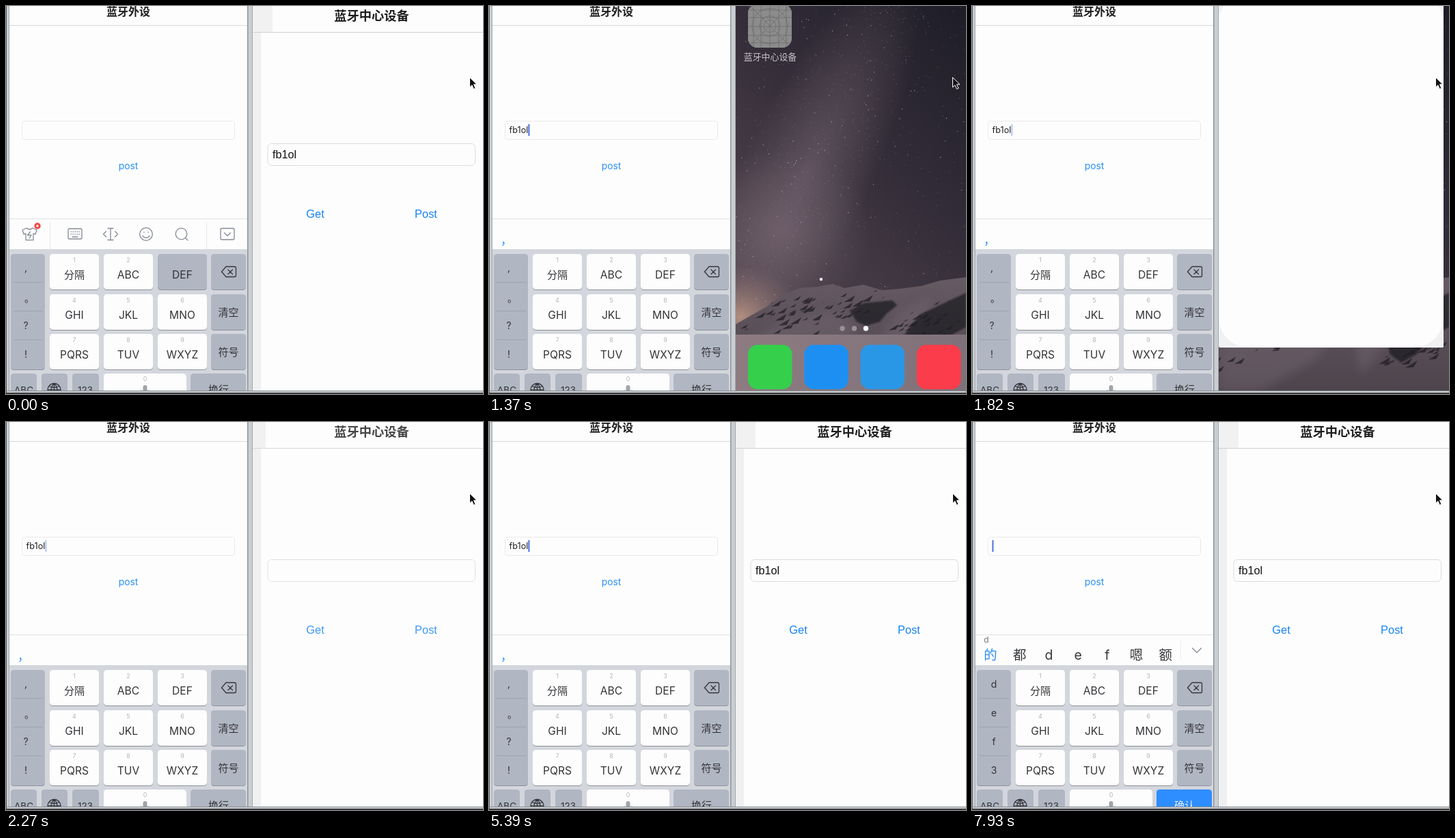
Write an HTML page that moves like this. It is 698 px wide and 568 px high and loops after 8000 ms.

```html
<!DOCTYPE html>
<html lang="zh">
<head>
<meta charset="utf-8">
<title>蓝牙外设</title>
<style>
html, body { margin: 0; width: 100%; height: 100%; overflow: hidden; background: #c9ced2; }
svg { display: block; width: 698px; height: 568px; }
text { font-family: Inter, "Noto Sans CJK SC", "Noto Sans CJK", sans-serif; }
.hv { font-family: "Liberation Sans", "Noto Sans CJK SC", sans-serif; }
.ic { fill: none; stroke: #858a96; stroke-width: 1.3; stroke-linecap: round; stroke-linejoin: round; }
</style>
</head>
<body>
<svg id="stage" viewBox="0 0 698 568" xmlns="http://www.w3.org/2000/svg"></svg>
<script>
const LOOP = 8000, BLUE = '#2b8ff5', KEY = '#b0b6c2', WHITE = '#fdfdfd', INK = '#333437';

const rect = (x, y, w, h, fill, more = '') =>
  `<rect x="${x}" y="${y}" width="${w}" height="${h}" fill="${fill}" ${more}/>`;
const text = (x, y, s, size, fill = INK, more = 'text-anchor="middle"') =>
  `<text x="${x}" y="${y}" font-size="${size}" fill="${fill}" ${more}>${s}</text>`;
const path = (d, more = 'class="ic"') => `<path d="${d}" ${more}/>`;
const group = (id, body, more = '') => `<g id="${id}" ${more}>${body}</g>`;
const key = (x, y, w, h, fill, id = '') =>
  rect(x, y + 1, w, h, '#8d9199', 'rx="4.5"') + rect(x, y, w, h, fill, `rx="4.5" ${id && `id="${id}"`}`);

// small seeded generator for the night sky and the snow
function random(seed) {
  return () => (seed = (seed * 16807) % 2147483647) / 2147483647;
}

function letterKeys() {
  const labels = ['分隔', 'ABC', 'DEF', 'GHI', 'JKL', 'MNO', 'PQRS', 'TUV', 'WXYZ'];
  return labels.map((s, i) => {
    const x = 64 + (i % 3) * 79, y = [363, 422, 480][Math.floor(i / 3)];
    return key(x, y, 72, 52, WHITE, 'k' + s) + text(x + 36, y + 12, i + 1, 9, '#b4b6ba') +
      text(x + 36, y + 36, s, i ? 15.6 : 15);
  }).join('');
}

function sideColumn() {
  const lines = [404, 446, 488].map(y => rect(11, y, 43, 1, '#9da3af')).join('');
  const marks = text(29, 388, ',', 14) + text(34, 433, '。', 14) + text(29, 473, '?', 14) + text(29, 515, '!', 14);
  const letters = ['d', 'e', 'f', '3'].map((s, i) => text(32, 389 + 42 * i, s, 14)).join('');
  return key(7, 363, 50, 169, KEY) + lines + group('marks', marks) + group('letters', letters);
}

function keyboard() {
  const dark = 'class="ic" style="stroke:#34363b"';
  const backspace = path('M322 381.5h12.5q2 0 2 2v11q0 2 -2 2h-12.5l-6.5-7.5zM325 386l6.5 6.5M331.5 386l-6.5 6.5', dark);
  const globe = path('M61 562a9.5 9.5 0 1 0 19 0a9.5 9.5 0 1 0 -19 0h19M70.5 552.5v19M70.5 552.5q-9 9.5 0 19M70.5 552.5q9 9.5 0 19M63 556.5q7.5 4 15 0', dark);
  return rect(5, 356, 348, 208, '#d3d6dc') + sideColumn() + letterKeys() +
    key(300, 363, 51, 52, KEY, 'erase') + backspace +
    key(300, 422, 51, 52, KEY) + text(325.5, 454, '清空', 15) +
    key(300, 480, 51, 52, KEY) + text(325.5, 512, '符号', 15) +
    key(7, 538, 38, 52, KEY) + text(26, 567, 'ABC', 13.5) +
    key(52, 538, 38, 52, KEY) + globe +
    key(97, 538, 39, 52, KEY) + text(116, 567, '123', 13.5) +
    key(143, 538, 121, 52, WHITE) + text(203.5, 549, '0', 9, '#b4b6ba') +
    rect(200.5, 555, 6, 14, '#a2a4a8', 'rx="3"') + path('M198 561v3q0 5 5.5 5t5.5-5v-3', 'fill="none" stroke="#b8babd"') +
    key(270, 538, 81, 52, KEY, 'enter') + text(311, 567, '换行', 15, INK, 'id="enterText" text-anchor="middle"');
}

function toolbar() {
  const dots = [0, 1, 2, 3, 4].map(i => `M${95 + i * 3} 330.5h.4M${95 + i * 3} 334h.4`).join('');
  return path('M30 325l-6 3 2 6 3-.8v9.5h11v-9.5l3 .8 2-6-6-3q-4.5 4-9 0zM35.5 330.5l-4 5h5.5l-3 4.5') +
    `<circle cx="46" cy="322" r="3.2" fill="#fff" stroke="#f04848" stroke-width="3"/>` +
    rect(64, 317, 1, 39, '#e6e7e9') + rect(293, 317, 1, 39, '#e6e7e9') +
    path('M93 326h16q2 0 2 2v11q0 2 -2 2h-16q-2 0 -2-2v-11q0-2 2-2zM97 338h8' + dots) +
    path('M149 325.5h8M153 325.5v17M149 342.5h8M146.5 330l-4 4 4 4M159.5 330l4 4-4 4') +
    `<circle class="ic" cx="205" cy="334" r="9.3"/>` +
    path('M200 336.5q5 6 10 0M202 331v.5M208 331v.5') +
    `<circle class="ic" cx="256.5" cy="333.5" r="8.3"/>` + path('M262.5 339.5l3.5 3.5') +
    path('M316 325.5h16q2 0 2 2v12.5q0 2 -2 2h-16q-2 0 -2-2v-12.5q0-2 2-2zM319.5 332l4.5 4.5 4.5-4.5');
}

function candidates() {
  const words = ['的', '都', 'd', 'e', 'f', '嗯', '额'];
  return text(21, 323, 'd', 12, '#777') +
    words.map((s, i) => text(27 + i * 42.7, 348, s, 19.5, i ? '#35373b' : BLUE)).join('') +
    rect(305, 320, 1, 28, '#eceded') + path('M322.5 331l6.5 6.5 6.5-6.5');
}

function leftPhone() {
  return rect(5, 0, 349, 564, WHITE) + rect(5, 28, 349, 1, '#d9d9dc') +
    text(179, 14, '蓝牙外设', 16, '#1d1d1f', 'text-anchor="middle" font-weight="700"') +
    rect(23.5, 168.5, 311, 27, 'none', 'rx="4" stroke="#e9e9e9" id="field"') +
    text(29.5, 186.3, '', 12.7, '#222', 'id="typed"') +
    rect(30, 173, 2, 17, '#4a6fe0', 'id="caret"') +
    text(179, 238.5, 'post', 13.8, BLUE) +
    rect(5, 311, 349, 1, '#dfe0e2') +
    group('tools', toolbar()) + group('words', candidates()) +
    group('comma', text(17, 349, '，', 17, BLUE, '')) + keyboard();
}

function sky() {
  const next = random(77);
  let faint = '', bright = '';
  for (let i = 0; i < 700; i++) {
    const y = next() * 440, band = 585 - y * .45;
    const x = i % 3 ? band + (next() + next() - 1) * 130 : 361 + next() * 337;
    const dot = `M${x.toFixed(1)} ${y.toFixed(1)}h.01`;
    if (i % 7) faint += dot; else bright += dot;
  }
  const stars = 'fill="none" stroke-linecap="round" ';
  return rect(361, 0, 337, 564, 'url(#night)') +
    `<ellipse cx="465" cy="245" rx="95" ry="330" transform="rotate(25 465 245)" fill="url(#haze)"/>` +
    `<ellipse cx="430" cy="330" rx="130" ry="120" fill="url(#haze)"/>` +
    `<ellipse cx="368" cy="455" rx="90" ry="75" fill="url(#dusk)"/>` +
    path(faint, stars + 'stroke="#a095a4" stroke-width="1" opacity=".6"') +
    path(bright, stars + 'stroke="#d8d0dc" stroke-width="1.3" opacity=".7"') +
    `<circle cx="486" cy="400" r="2.3" fill="#e9e6f2"/>`;
}

// dark rock streaks running down the slope
function rocks(seed, count, x, y, w, h) {
  const next = random(seed);
  let d = '';
  for (let i = 0; i < count; i++) {
    const u = next(), v = next(), run = 4 + next() * 14;
    d += `M${(x + u * w).toFixed(1)} ${(y + v * h - u * h * .35).toFixed(1)}l${(-run).toFixed(1)} ${(run * .6).toFixed(1)}l${(run * .7).toFixed(1)} -1z`;
  }
  return path(d, 'fill="#211d25" opacity=".75"');
}

function mountains() {
  const ridge = 'M361 466L385 452 405 441 433 421 455 413 480 411 503 407 520 413 548 408 575 416 600 414 632 410 660 402 698 397V564H361z';
  return path(ridge, 'fill="url(#snow)"') +
    `<g clip-path="url(#ridge)">` +
    path('M361 500L430 462 500 446 540 470 500 520 420 564H361zM560 500L600 448 650 424 640 450 600 500 570 540z', 'fill="#7d6f79" opacity=".35" filter="url(#blur)"') +
    path('M528 446L548 435 590 431 597 438 582 450 572 462 552 468 538 462zM606 484L630 452 698 420V470L672 484 650 510 628 522 612 510z', 'fill="#1e1b22" opacity=".75" filter="url(#soft)"') +
    rocks(5, 45, 405, 425, 190, 35) + rocks(9, 60, 600, 450, 98, 85) + rocks(21, 22, 365, 468, 120, 60) +
    `</g><clipPath id="ridge">${path(ridge, '')}</clipPath>`;
}

function appIcon() {
  const grid = [8, 19, 32, 45, 56].map(n => `M${379 + n} -2V61M379 ${n - 2}H443`).join('');
  const rings = [9, 15, 26].map(r => `<circle cx="411" cy="29.5" r="${r}"/>`).join('');
  return rect(379, -3, 64, 64, '#fff', 'rx="14"') +
    `<g fill="none" stroke="#bcbcbf" stroke-width=".7" clip-path="url(#iconClip)">${path(grid, '')}${rings}${path('M379 -3L443 61M443 -3L379 61', '')}</g>` +
    rect(379, -3, 64, 64, '#000', 'rx="14" opacity=".45" id="pressed"') +
    text(411.5, 78.5, '蓝牙中心设备', 12.9, '#c9c4ca');
}

function home() {
  const dock = ['#35cf4c', '#1e8ff2', '#2a97e6', '#fb3c4a']
    .map((c, i) => rect(379 + i * 82.3, 496, 64.5, 65, c, 'rx="14"')).join('');
  const pages = [517, 534.5, 551.5]
    .map((x, i) => `<circle cx="${x}" cy="472" r="3.7" fill="${i < 2 ? '#9a9098' : '#fff'}"/>`).join('');
  return sky() + mountains() +
    group('icons', appIcon() + pages + rect(361, 481, 337, 83, 'url(#dock)') + dock) +
    group('zoom', text(479, 261, '蓝牙中心设备', 44, '#e5dfe4', 'text-anchor="middle" opacity=".4" filter="url(#soft)"') +
      rect(369, -20, 219, 314, '#f1f1f2', 'rx="2" id="sheet"') +
      rect(373, -20, 214, 314, WHITE, 'rx="44" id="inner"'));
}

function rightApp() {
  const hv = 'class="hv" text-anchor="middle"';
  return rect(361, 0, 337, 564, WHITE) + rect(361, 39, 12, 525, '#f0f0f0') +
    rect(361, 0, 29, 38, '#f1f1f1', 'id="shade"') +
    group('content',
      rect(361, 38, 337, 1, '#cfcfd1') +
      text(535, 21, '蓝牙中心设备', 18.3, '#1d1d1f', hv + ' font-weight="700"') +
      rect(383, 201.5, 303.5, 32, 'none', 'rx="5.5" stroke="#dcdcdd"') +
      text(390, 222.5, 'fb1ol', 16.2, '#111', 'class="hv" id="received"') +
      text(452.5, 310, 'Get', 16.4, '#1583f7', hv) +
      text(614.5, 310, 'Post', 16.4, '#1583f7', hv));
}

const defs = `<defs>
  <clipPath id="leftClip"><rect x="5" width="349" height="564"/></clipPath>
  <clipPath id="rightClip"><rect x="361" width="337" height="564"/></clipPath>
  <clipPath id="iconClip"><rect x="379" y="-3" width="64" height="64" rx="14"/></clipPath>
  <filter id="soft"><feGaussianBlur stdDeviation="1.2"/></filter>
  <filter id="blur"><feGaussianBlur stdDeviation="7"/></filter>
  <linearGradient id="night" x1="1" y1="0" x2=".4" y2="1"><stop stop-color="#1e1d27"/><stop offset=".45" stop-color="#332d39"/><stop offset="1" stop-color="#54464f"/></linearGradient>
  <radialGradient id="haze"><stop stop-color="#7c6b78" stop-opacity=".55"/><stop offset=".5" stop-color="#75656f" stop-opacity=".3"/><stop offset="1" stop-color="#75656f" stop-opacity="0"/></radialGradient>
  <radialGradient id="dusk"><stop stop-color="#c09a88" stop-opacity=".85"/><stop offset="1" stop-color="#9a7c7c" stop-opacity="0"/></radialGradient>
  <linearGradient id="snow" x2="0" y2="1"><stop stop-color="#665a63"/><stop offset="1" stop-color="#4d444c"/></linearGradient>
  <linearGradient id="dock"><stop stop-color="#8d7b81"/><stop offset="1" stop-color="#7f7179"/></linearGradient>
</defs>`;

document.getElementById('stage').innerHTML = defs + rect(0, 0, 698, 568, '#c9ced2') +
  rect(0, 0, 1, 568, '#55585c') + rect(4, 0, 1, 564, '#a4a7aa') +
  `<g clip-path="url(#leftClip)">${leftPhone()}</g>` +
  rect(353, 0, 1.5, 564, '#8f9498') + rect(360, 0, 1, 564, '#a3a8ac') +
  `<g clip-path="url(#rightClip)">${group('home', home())}${group('app', rightApp())}</g>` +
  rect(0, 563, 698, 1, '#8b8e91') + rect(0, 566, 698, 2, '#3a3b3d') +
  path('M678.5 104.5V119l3.4-3.2 2.5 5.7 2.6-1.1-2.5-5.6h4.5z', 'fill="#111" stroke="#fff" stroke-width="1"');

const el = id => document.getElementById(id);
const show = (id, on) => el(id).setAttribute('visibility', on ? 'visible' : 'hidden');
const fill = (id, color) => el(id).setAttribute('fill', color);
const within = (t, a, b) => t >= a && t < b;
const stepAt = (steps, t) => steps.reduce((v, s) => t >= s[0] ? s[1] : v, steps[0][1]);

// caret opacity from each time on
const blink = [[0, 0], [150, 1], [930, 0], [1370, 1], [1820, .4], [1970, 0], [2270, .4], [2410, 1],
  [2860, .4], [3010, 0], [3310, .4], [3460, 1], [3750, .4], [3900, 0], [4350, 1], [4790, .4], [4940, 0],
  [5240, .4], [5390, 1], [6590, 0], [6880, 1], [7180, .4], [7330, 0], [7780, .4], [7930, 1]];

function typedAt(t) {
  if (t < 150 || t >= 6440) return '';
  return 'fb1ol'.slice(0, t < 5840 ? 5 : 4 - Math.floor((t - 5840) / 150));
}

function launch(t) {
  const [right, bottom] = t < 1820 ? [588, 294] : t < 1970 ? [690, 500] : [720, 600];
  const left = t < 1820 ? 369 : 361;
  const inset = t < 1820 ? 4 : 0;
  for (const [id, pad] of [['sheet', 0], ['inner', inset]]) {
    el(id).setAttribute('x', left + pad);
    el(id).setAttribute('width', right - left - pad);
    el(id).setAttribute('height', bottom + 20);
  }
}

function render(t) {
  const typed = typedAt(t), empty = typed === '', choosing = t >= 7630;
  el('typed').textContent = typed;
  el('caret').setAttribute('x', empty ? 29.5 : 29.5 + el('typed').getComputedTextLength());
  el('caret').setAttribute('opacity', stepAt(blink, t));
  show('field', !within(t, 150, 630));
  show('comma', !empty);
  show('tools', empty && !choosing);
  show('words', choosing);
  show('marks', !choosing);
  show('letters', choosing);
  fill('kDEF', t < 150 || within(t, 7480, 7780) ? KEY : WHITE);
  fill('erase', within(t, 5690, 6590) ? WHITE : KEY);
  fill('enter', choosing ? '#2e8dff' : KEY);
  fill('enterText', choosing ? '#e8f2ff' : INK);
  el('enterText').textContent = choosing ? '确认' : '换行';

  const atHome = within(t, 150, 2120), zooming = within(t, 1670, 2120);
  el('home').style.display = atHome ? '' : 'none';
  el('app').style.display = atHome ? 'none' : '';
  el('icons').style.display = zooming ? 'none' : '';
  el('zoom').style.display = zooming ? '' : 'none';
  show('pressed', within(t, 1370, 1670));
  launch(t);
  el('content').setAttribute('opacity', within(t, 2120, 2270) ? .35 : within(t, 2270, 2410) ? .82 : 1);
  el('shade').setAttribute('width', within(t, 2120, 2410) ? 19 : 29);
  show('received', t < 150 || t >= 2860);
}

const start = performance.now();
function tick() {
  render((performance.now() - start) % LOOP);
  requestAnimationFrame(tick);
}
tick();
</script>
</body>
</html>
```
